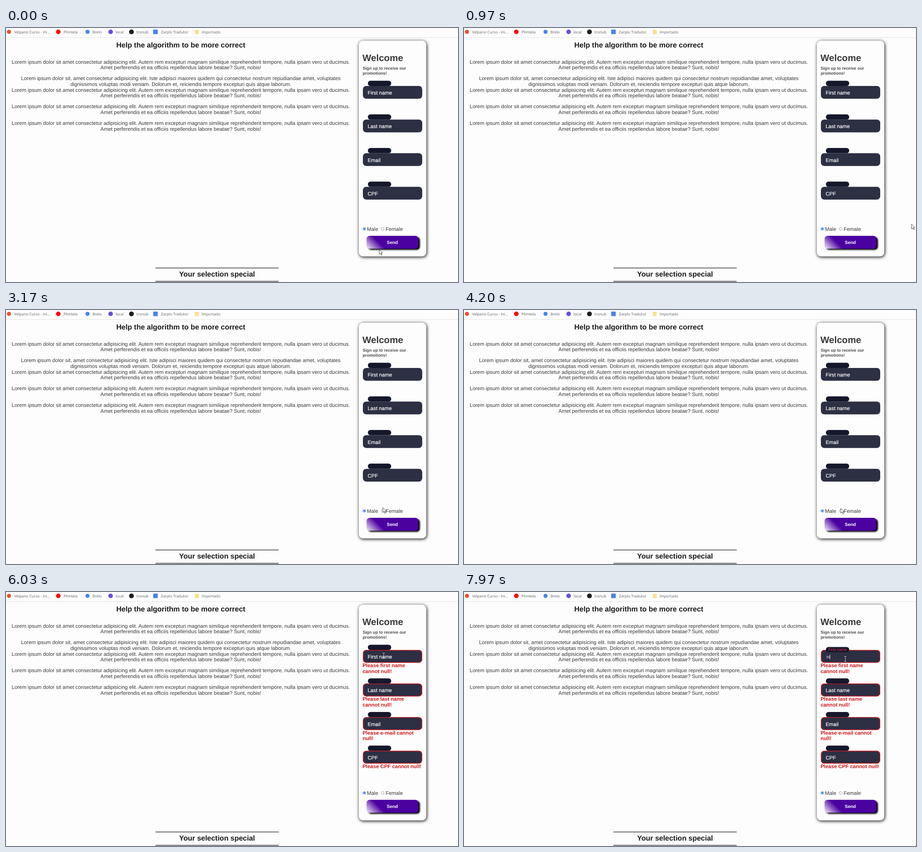
An HTML page that plays this animation: 998 by 561 pixels, repeating every 8000 ms.

```html
<!DOCTYPE html>
<html lang="en">
<head>
<meta charset="utf-8">
<title>Sign-up form</title>
<style>
  html, body { margin: 0; width: 100%; height: 100%; overflow: hidden; background: #fdfdfd; }
  svg { display: block; width: 100%; height: 100%; }
  filter { color-interpolation-filters: sRGB; }
  text { font-family: "Liberation Sans", Arial, sans-serif; font-size: 11.42px; fill: #383838; text-rendering: geometricPrecision; }
  .bold { font-weight: bold; }
  .mid { text-anchor: middle; }
  .title { font-weight: bold; font-size: 15.98px; fill: #191919; }
  .tab { font-family: "Open Sans", "Noto Sans", sans-serif; font-size: 8.3px; fill: #5c5f63; }
  .label { fill: #fff; stroke: #fff; stroke-width: .2px; }
  .focused { fill: #dc2f55; stroke: none; }
  .error { font-weight: bold; fill: #d0191c; }
</style>
</head>
<body>
<svg id="stage" viewBox="0 0 998 561">
  <defs>
    <filter id="cardShadow" x="-20%" width="140%">
      <feDropShadow dx="1" dy="1.5" stdDeviation="3.9" flood-color="#000"/>
    </filter>
    <filter id="buttonShadow" x="-20%" y="-50%" width="140%" height="200%">
      <feDropShadow dx="3.5" dy="2.5" stdDeviation="1.7" flood-color="#000"/>
    </filter>
    <linearGradient id="purple" gradientUnits="userSpaceOnUse" x1="796" y1="488" x2="817" y2="467">
      <stop offset="0" stop-color="#f8f2fc"/><stop offset="1" stop-color="#4b00a0"/>
    </linearGradient>
  </defs>
  <g id="page"></g>
  <g id="cursors">
    <path id="arrow" d="M0 0V10.6L2.5 8.4L4.4 12.6L6 11.9L4.2 7.8H7.6Z" fill="#fff" stroke="#222" stroke-width=".8"/>
    <path id="hand" d="M-1.2 .8Q0 -.7 1.2 .8V5.2Q2.6 4.4 3.4 5.5Q4.8 4.8 5.4 6Q7 5.6 7 7.3V10.5Q6.8 12.5 5.5 13.8V15H-.6V13.8Q-2.8 11.5-4.2 8.6Q-4 7-2.5 7.8L-1.2 9.2Z" fill="#fff" stroke="#222" stroke-width=".9"/>
    <path id="beam" d="M-2.3-5.5H2.3M0-5.5V5.5M-2.3 5.5H2.3" fill="none" stroke="#d4d4d8" stroke-width=".9"/>
  </g>
</svg>
<script>
const LOOP = 8000, ERRORS_AT = 4750, FOCUS_AT = 6800, TYPE_AT = 7800;
const $ = id => document.getElementById(id);
const text = (x, y, str, cls = '', extra = '') => `<text x="${x}" y="${y}" class="${cls}" ${extra}>${str}</text>`;
const rect = (x, y, w, h, r, fill, extra = '') =>
  `<rect x="${x}" y="${y}" width="${w}" height="${h}" rx="${r}" fill="${fill}" ${extra}/>`;
const dot = (x, y, r, fill, extra = '') => `<circle cx="${x}" cy="${y}" r="${r}" fill="${fill}" ${extra}/>`;

function bookmarks() {
  const tabs = [[18, 'Velpano Curso - Ini...'], [127, 'Plimtela'], [191, 'Brelo'],
    [242, 'local'], [288, 'tronub'], [342, 'Zarplo Tradutor'], [432, 'Importado']];
  return tabs.map(([x, name]) => text(x, 11.5, name, 'tab')).join('') +
    dot(6.5, 8.5, 4.5, '#f04e23') + dot(115.5, 8.5, 5, '#f00') + dot(180, 8.5, 4.5, '#4285f4') +
    dot(231, 8.5, 5, '#6a4ce0') + dot(277, 8.5, 5.3, '#1b1f23') +
    rect(325, 3.5, 10, 10, 0, '#4a82e8') + rect(417, 4, 8.5, 9.5, 1, '#fbe08a') +
    rect(0, 20.6, 998, 1, 0, '#e0e0e2');
}

function article() {
  const long = ['Lorem ipsum dolor sit amet consectetur adipisicing elit. Autem rem excepturi magnam similique reprehenderit tempore, nulla ipsam vero ut ducimus.',
    'Amet perferendis et ea officiis repellendus labore beatae? Sunt, nobis!'];
  const other = ['Lorem ipsum dolor sit, amet consectetur adipisicing elit. Iste adipisci maiores quidem qui consectetur nostrum repudiandae amet, voluptates',
    'dignissimos voluptas modi veniam. Dolorum et, reiciendis tempore excepturi quis atque laborum.'];
  const paragraphs = [[78.5, long], [115.2, other], [140.6, long], [177.3, long], [214, long]];
  return text(386, 42.7, 'Help the algorithm to be more correct', 'title mid') +
    paragraphs.map(([y, lines]) => lines.map((line, i) => text(386, y + i * 12.7, line, 'mid')).join('')).join('') +
    rect(330, 529.4, 272, 1.3, 0, '#222') + rect(330, 558.8, 272, 1.3, 0, '#222') +
    text(466, 549, 'Your selection special', 'title mid');
}

function field(i, name, errors) {
  const y = 127.9 + i * 74.25;
  return rect(788, y, 131, 28.4, 7.5, '#2d2f43') +
    rect(788.7, y + .7, 129.6, 27, 7, 'none', 'class="invalid" stroke="#e01216" stroke-width="1.4"') +
    rect(799, y - 11.4, 51.5, 11.6, 5.6, '#15172b', `id="cut${i}"`) +
    text(0, 0, name, 'label', `id="label${i}" transform="translate(798.5 ${y + 19.2})"`) +
    errors.map((line, k) => text(787.2, y + 38.2 + k * 12.8, line, 'error invalid')).join('');
}

function form() {
  return rect(779, 28, 149, 476.5, 9, '#fdfdfd', 'filter="url(#cardShadow)"') +
    text(787, 72.5, 'Welcome', 'bold', 'style="font-size:20.55px"') +
    ['Sign up to receive our', 'promotions!'].map((line, i) =>
      text(787.5, 92 + i * 10.6, line, 'bold', 'style="font-size:9.13px;fill:#484848"')).join('') +
    field(0, 'First name', ['Please first name', 'cannot null!']) +
    field(1, 'Last name', ['Please last name', 'cannot null!']) +
    field(2, 'Email', ['Please e-mail cannot', 'null!']) +
    field(3, 'CPF', ['Please CPF cannot null!']) +
    text(800.4, 146.8, 'H', '', 'id="typed" style="font-size:9.5px;fill:#eee"') +
    rect(0, 138.2, .9, 10.6, 0, '#eee', 'id="caret"') +
    dot(791.2, 443.7, 3.1, '#fff', 'stroke="#1a73e0" stroke-width=".8"') + dot(791.2, 443.7, 1.9, '#1a73e0') +
    dot(831.7, 443.7, 3.1, '#fff', 'stroke="#777" stroke-width=".7"') +
    text(797, 447.5, 'Male') + text(838.3, 447.5, 'Female') +
    rect(796, 459, 114.5, 28.6, 7, 'url(#purple)', 'id="button"') +
    text(853, 476.8, 'Send', 'bold mid', 'style="font-size:10px;fill:#fff"');
}

$('page').innerHTML = bookmarks() + article() + form();

// Pointer stops: time, x, y
const path = [[0, 824, 489], [250, 826, 490], [830, 938, 468], [970, 988, 433], [1120, 988, 433],
  [1670, 853, 481.5], [2600, 851, 481], [2950, 834, 440], [3170, 832, 436.5], [4200, 832, 438],
  [4550, 838, 476], [5600, 838, 477], [5850, 835, 390], [6030, 834, 140.5], [6250, 834, 140.5],
  [6700, 842, 148], [LOOP, 842, 148]];
const smooth = p => p * p * (3 - 2 * p);
const clamp = v => Math.min(1, Math.max(0, v));
const mix = (a, b, p) => a + (b - a) * p;
const show = (el, on) => el.setAttribute('visibility', on ? 'visible' : 'hidden');

function pointer(t) {
  const i = path.findIndex(stop => stop[0] > t);
  const [t0, x0, y0] = path[i - 1], [t1, x1, y1] = path[i];
  const p = smooth((t - t0) / (t1 - t0));
  return [mix(x0, x1, p), mix(y0, y1, p)];
}

function cursorAt(x, y) {
  if (x > 796 && x < 911 && y > 459 && y < 488) return 'hand';
  const row = (y - 127.9) % 74.25;
  const overField = x > 788 && x < 919 && y > 127.9 && y < 379 && row < 28.4;
  return overField ? 'beam' : 'arrow';
}

const invalid = document.querySelectorAll('.invalid');

function draw(t) {
  const [x, y] = pointer(t), shape = cursorAt(x, y);
  for (const id of ['arrow', 'hand', 'beam']) show($(id), id === shape);
  $('cursors').setAttribute('transform', `translate(${x} ${y})`);

  const hover = shape === 'hand';
  $('button').setAttribute('opacity', hover ? .8 : 1);
  $('button').setAttribute('filter', hover ? 'none' : 'url(#buttonShadow)');
  invalid.forEach(el => show(el, t >= ERRORS_AT));

  const lift = smooth(clamp((t - FOCUS_AT) / 200));
  $('cut0').setAttribute('transform', `translate(0 ${5 * lift})`);
  $('label0').setAttribute('transform',
    `translate(${mix(798.5, 804.6, lift)} ${mix(147.1, 129.6, lift)}) scale(${mix(1, .75, lift)})`);
  $('label0').classList.toggle('focused', t >= FOCUS_AT);

  const typed = t >= TYPE_AT;
  show($('typed'), typed);
  $('caret').setAttribute('x', typed ? 807.7 : 800.6);
  show($('caret'), t >= FOCUS_AT && (t - (typed ? TYPE_AT : FOCUS_AT)) % 1000 < 500);
}

function tick() {
  draw(performance.now() % LOOP);
  requestAnimationFrame(tick);
}
tick();
</script>
</body>
</html>
```
